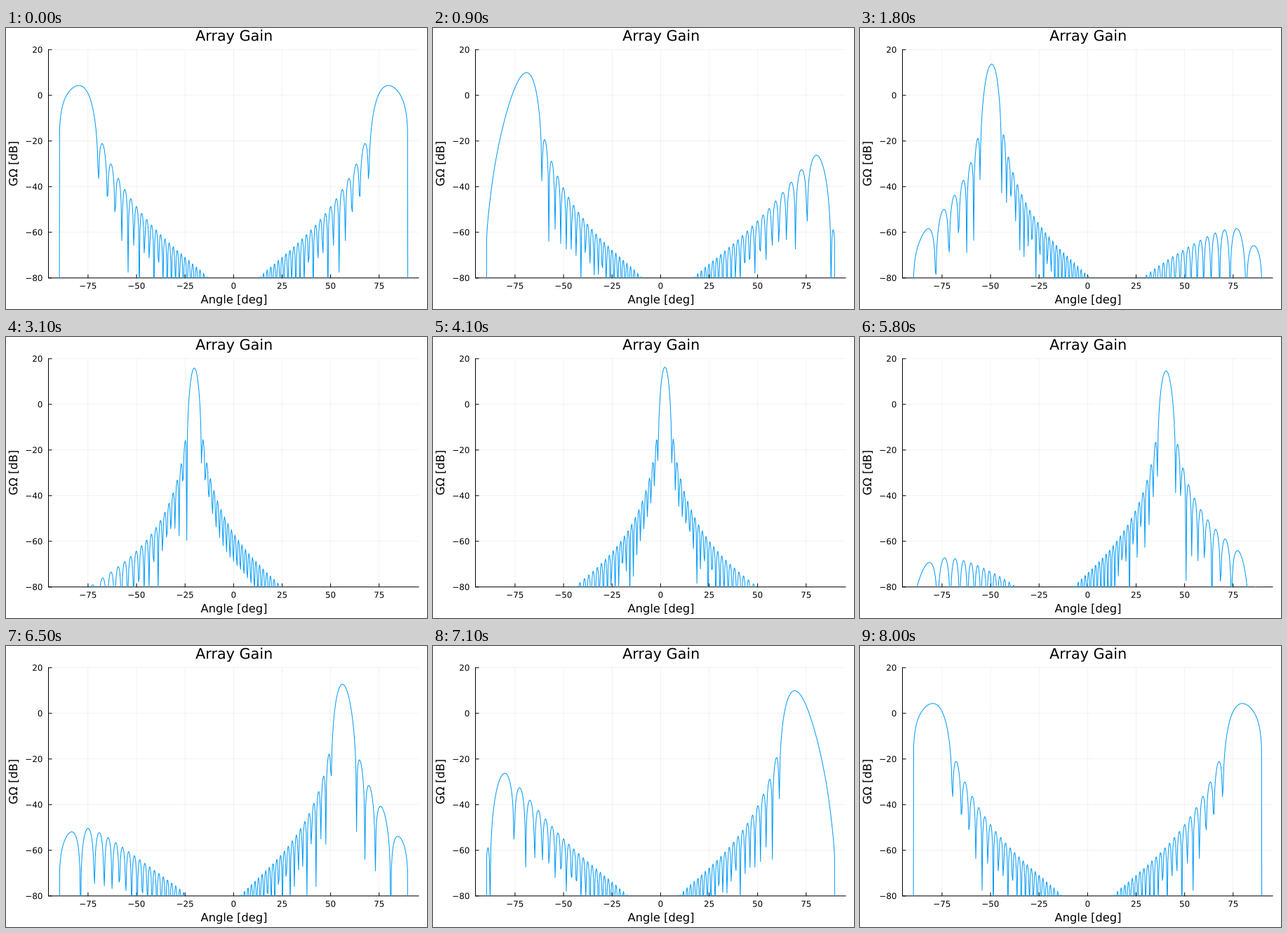
A matplotlib script that plays this animation: 600x400 px, repeating every 8100 ms.

```python
import matplotlib.pyplot as plt
import numpy as np
from matplotlib.animation import FuncAnimation
from matplotlib.patches import PathPatch, Rectangle
from matplotlib.textpath import TextPath
from matplotlib.transforms import Affine2D

plt.rcParams["font.family"] = "DejaVu Sans"
plt.rcParams["path.simplify"] = False

WIDTH, HEIGHT, DPI = 600, 400, 100
LEFT, RIGHT, TOP, BOTTOM = 60.5, 588.19, 30.87, 355.8
X_LIMIT, Y_MIN, Y_MAX = 95.4, -80, 20
FRAMES, INTERVAL = 81, 100
TICK_LENGTH = 4.72
PX = 72 / DPI

# Hann-weighted array with half-wavelength spacing
ELEMENTS = 64
ELEMENT_EXPONENT = 1.4
index = np.arange(ELEMENTS)
weights = 0.5 - 0.5 * np.cos(2 * np.pi * index / ELEMENTS)
angles = np.linspace(-90, 90, 501)
steering = np.linspace(-90, 90, FRAMES)

fig = plt.figure(figsize=(WIDTH / DPI, HEIGHT / DPI), dpi=DPI, facecolor="white")
ax = fig.add_axes([0, 0, 1, 1])
ax.set(xlim=(0, WIDTH), ylim=(0, HEIGHT))
ax.axis("off")


def to_x(angle):
    return LEFT + (angle + X_LIMIT) / (2 * X_LIMIT) * (RIGHT - LEFT)


def to_y(level):
    return HEIGHT - BOTTOM + (level - Y_MIN) / (Y_MAX - Y_MIN) * (BOTTOM - TOP)


def gain(steer):
    u = np.sin(np.radians(angles)) - np.sin(np.radians(steer))
    field = np.exp(1j * np.pi * np.outer(u, index)) @ weights
    power = np.abs(field) ** 2 / np.sum(weights ** 2)
    power = np.maximum(power, 1e-30)
    pattern = np.cos(np.radians(angles)) ** ELEMENT_EXPONENT
    return 10 * np.log10(power * pattern)


def stroke(xs, ys, color="black", width=1.0, **style):
    line, = ax.plot(xs, ys, color=color, lw=width * PX, snap=False,
                    solid_capstyle="round", solid_joinstyle="round", **style)
    return line


def label(text, x, baseline, size, align="center", angle=0):
    """Place text by its ink edges, with the baseline in pixels from the top."""
    path = TextPath((0, 0), text, size=size)
    box = path.get_extents()
    shift = box.x1 if align == "right" else (box.x0 + box.x1) / 2
    move = Affine2D().translate(-shift, 0).rotate_deg(angle)
    move.translate(x, HEIGHT - baseline)
    ax.add_patch(PathPatch(move.transform_path(path), fc="black", lw=0, snap=False))


def number(value):
    return str(value).replace("-", "\u2212")


left, right, low, high = LEFT, RIGHT, to_y(Y_MIN), to_y(Y_MAX)
x_ticks = range(-75, 76, 25)
y_ticks = range(Y_MIN, Y_MAX + 1, 20)
grid = dict(width=0.5, alpha=0.1)

for tick in x_ticks:
    x = to_x(tick)
    stroke([x, x], [low, high], **grid)
    stroke([x, x], [low, low + TICK_LENGTH])
    label(number(tick), x, 371.25, 11.85)

for tick in y_ticks:
    y = to_y(tick)
    stroke([left, right], [y, y], **grid)
    stroke([left, left + TICK_LENGTH], [y, y])
    label(number(tick), 51.6, HEIGHT - y + 4.32, 11.85, align="right")

stroke([left, right], [low, low])
stroke([left, left], [low, high])

center_x, center_y = (LEFT + RIGHT) / 2, (TOP + BOTTOM) / 2
label("Array Gain", center_x, 18.14, 20.74)
label("Angle [deg]", center_x, 392, 16.3)
label("GΩ [dB]", 16.07, center_y, 16.3, angle=90)

curve = stroke([], [], color="#009AF9")
curve.set_clip_path(Rectangle((left, low), right - left, high - low,
                              transform=ax.transData))


def update(frame):
    curve.set_data(to_x(angles), to_y(gain(steering[frame])))
    return curve,


animation = FuncAnimation(fig, update, frames=FRAMES, interval=INTERVAL,
                          repeat=True, repeat_delay=0)
plt.show()
```
